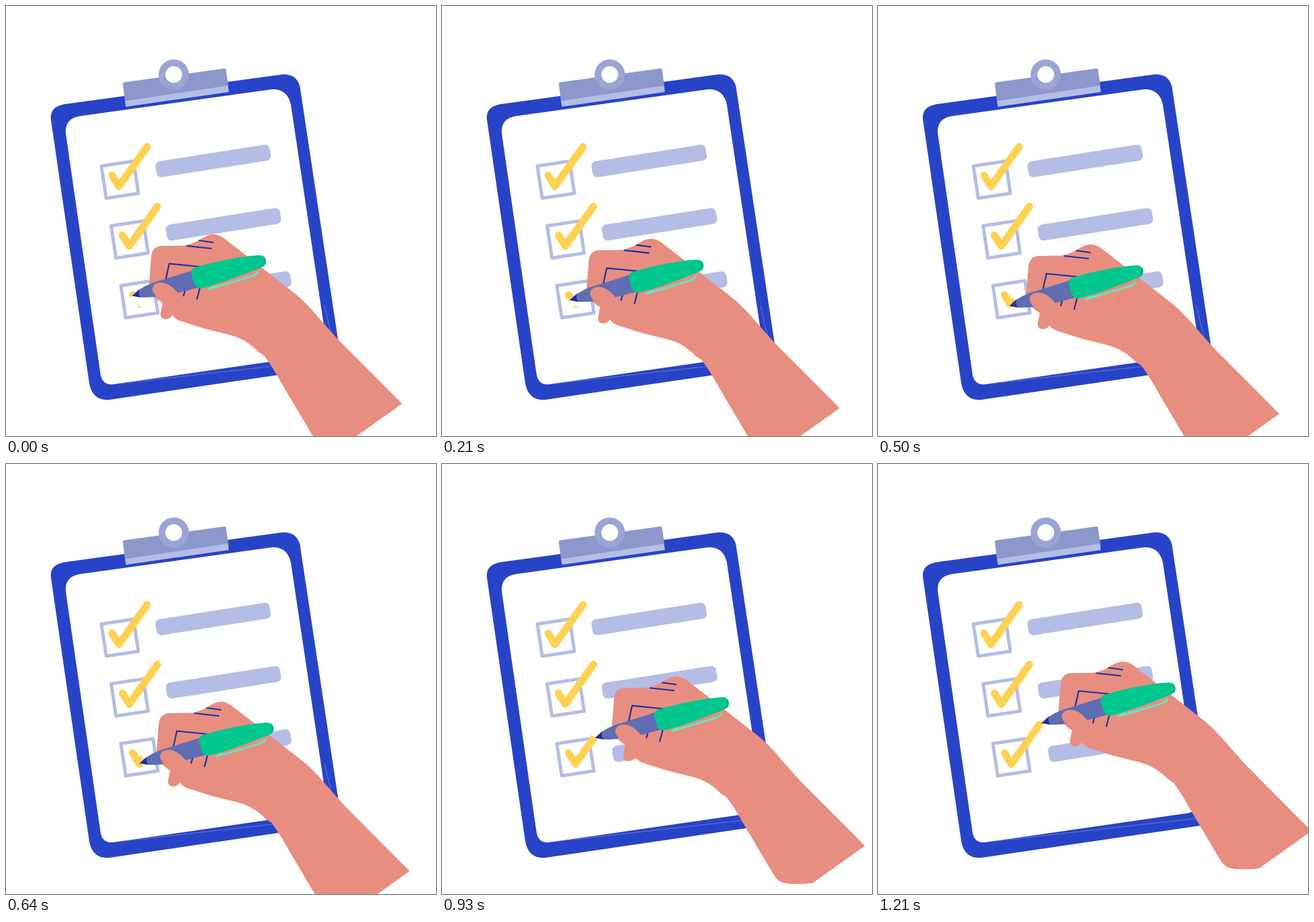
These frames come from a looping animation (640x640 px, 2000 ms). An HTML page:

```html
<!DOCTYPE html>
<html lang="en">
<head>
<meta charset="utf-8">
<title>Checklist</title>
<style>
  html, body { margin: 0; width: 100%; height: 100%; overflow: hidden; background: #fff; }
  svg { display: block; width: 100%; height: 100%; }
  .frame { fill: #2744c8; }
  .pale { fill: #b4bde6; }
  .box { fill: #fff; stroke: #b4bde6; stroke-width: 5; stroke-linejoin: round; }
  .tick { fill: none; stroke: #ffd152; stroke-width: 11; stroke-linecap: round; stroke-linejoin: round; }
  .crumb { fill: none; stroke: #ffd152; stroke-width: 1.1; }
  .skin { fill: #e88e80; }
  .crease { fill: none; stroke: #1b2fa6; stroke-width: 2.1; }
  .mint { fill: none; stroke: #5fe8c4; stroke-width: 2.8; stroke-linecap: round; stroke-linejoin: round; }
</style>
</head>
<body>
<svg viewBox="0 0 640 640">
  <defs>
    <rect id="box" class="box" x="-24.2" y="-24.2" width="48.4" height="48.4" transform="translate(169.5 258.5) rotate(-8.6)"/>
    <rect id="bar" class="pale" x="-86" y="-12" width="172" height="24" rx="7" transform="translate(308.3 230.7) rotate(-8.9)"/>
    <path id="tick" class="tick" d="M158 252L168 268.5L210 209.5"/>
    <mask id="drawn" maskUnits="userSpaceOnUse" x="0" y="0" width="640" height="640">
      <path id="reveal" d="M184.4 423.2L198.5 446.5L245.1 381" fill="none" stroke="#fff" stroke-width="18"/>
    </mask>
  </defs>

  <!-- clipboard -->
  <path class="frame" d="M67 170Q64 149.500 88 146L410 102Q432 100 437.500 120L498 522Q499 535 488 537L154 586Q129 588 124 562Z"/>
  <path fill="#fff" d="M89 190Q87 168 109 164L396 124Q419 123 424 147L476 495Q479 516 462 519.500L160 563Q143 565 140.500 547Z"/>
  <path d="M172 561.500L478 527M474 446L485 492" fill="none" stroke="#7d8ee0" stroke-width=".7"/>
  <path fill="#8c97cb" d="M176 113.500L325 93Q327 92.500 327.500 95L331 119L177 141L174 117Q173.500 114 176 113.500Z"/>
  <path class="pale" d="M177 141L330.500 118.500L331.700 128L178.500 150Z"/>
  <circle cx="249.700" cy="102" r="17.500" fill="#fff" stroke="#9aa4d5" stroke-width="10"/>

  <!-- list -->
  <use href="#bar"/>
  <use href="#bar" x="15.300" y="94.200"/>
  <use href="#bar" x="30.600" y="188.400"/>
  <use href="#box"/>
  <use href="#box" x="14.500" y="89"/>
  <use href="#box" x="29" y="178"/>
  <use href="#tick"/>
  <use href="#tick" x="15.300" y="89"/>
  <g mask="url(#drawn)"><use href="#tick" x="30.500" y="178"/></g>
  <path id="low" class="crumb" d="M194.500 449.500l4-1.500l-2.500-4M199.500 446.500l4.500 2.500"/>
  <path id="high" class="crumb" d="M236.500 383.500l2.500 3.500M242.500 388.500h2"/>

  <g id="hand">
    <path class="skin" d="M216 374Q217 358 231 357L266 356.500Q278 354 288 348Q300 340 308 339.700Q316 339.500 325 346L352 367L384 392L430 428Q446 441 462 460Q474 474 492 494L589.500 592L511.500 647.500Q480 651 466 646.500Q458 643 453 634L408 558Q396 536 384 520L376 515Q358 496 335 490L295 480L257 468Q250 464 247 460Q246 465 238 466Q229 466 230 457L233 442Q213 430 213 412Z"/>
    <path class="crease" d="M269 357L306 361M287 349L309 352M237.500 408L243 383.500L294 388.500M264 432L268 418M284 437L289 418"/>
    <path fill="#5f6db3" d="M197 423Q207 416 218 412L279 393L286 419L256 427Q225 435 199 433.500Z"/>
    <path fill="#1b2fa6" d="M187.500 431.500L198.500 421.500Q196.500 428 200.500 433.700Z"/>
    <path fill="#00c78d" d="M276 397Q276 391 282 389C310 381 345 373 375 371Q386.500 370 387 380Q387 387 376 391C350 401 320 413 291 420Q283 421 280 413Q276 402 276 397Z"/>
    <path fill="#00b27e" d="M383 373Q387 375 387 381Q386.500 386 382 388Q386 380 383 373Z"/>
    <path class="mint" d="M375 396Q374 399.500 367 402L302 421.500L310 417"/>
    <path class="skin" d="M218 423Q217 413 230 411.500Q243 411 256 427L270 440L250 462L232 441Q219 429 218 423Z"/>
  </g>
</svg>
<script>
  const LOOP = 2000, FPS = 14, LAST = 17;
  // step, x, y of the hand along the stroke
  const path = [
    [0, 0, 0], [3, 2.3, 6.6], [5, 5, 12], [7, 7.8, 15], [9, 11.3, 14],
    [11, 23, 0.1], [13, 40, -23.8], [15, 51.7, -40.8], [17, 55.7, -45.7]
  ];
  const $ = id => document.getElementById(id);

  function slope(i, axis) {
    if (i === 0 || i === path.length - 1) return 0;
    const a = path[i - 1], b = path[i + 1];
    return (b[axis] - a[axis]) / (b[0] - a[0]);
  }

  function along(step, axis) {
    let i = 0;
    while (i < path.length - 2 && step > path[i + 1][0]) i++;
    const a = path[i], b = path[i + 1], span = b[0] - a[0];
    const u = (step - a[0]) / span, v = 1 - u;
    return v * v * (1 + 2 * u) * a[axis] + u * u * (3 - 2 * u) * b[axis]
      + span * u * v * (v * slope(i, axis) - u * slope(i + 1, axis));
  }

  // length of the tick already written, with the pen moved by x, y
  function inked(step, x, y) {
    if (step === LAST) return 110;
    const down = Math.min(19.3, x * 0.518 + y * 0.855 + 1);
    if (step < 8) return down;
    return 19.3 + Math.max(0, (x - 10.5) * 0.58 + (15.5 - y) * 0.815);
  }

  function draw(now) {
    const t = Math.floor(now % LOOP / 10) * 10;
    const step = Math.min(LAST, Math.floor((t + 5) * FPS / 1000));
    const x = along(step, 1), y = along(step, 2);
    $("hand").setAttribute("transform", `translate(${x} ${y})`);
    $("reveal").setAttribute("stroke-dasharray", `${8 + inked(step, x, y)} 300`);
    $("low").style.opacity = step < 8 ? 1 : 0;
    $("high").style.opacity = step > 11 && step < 16 ? 1 : step === 11 ? 0.3 : 0;
  }

  const start = performance.now();
  function tick() {
    draw(performance.now() - start);
    requestAnimationFrame(tick);
  }
  tick();
</script>
</body>
</html>
```
